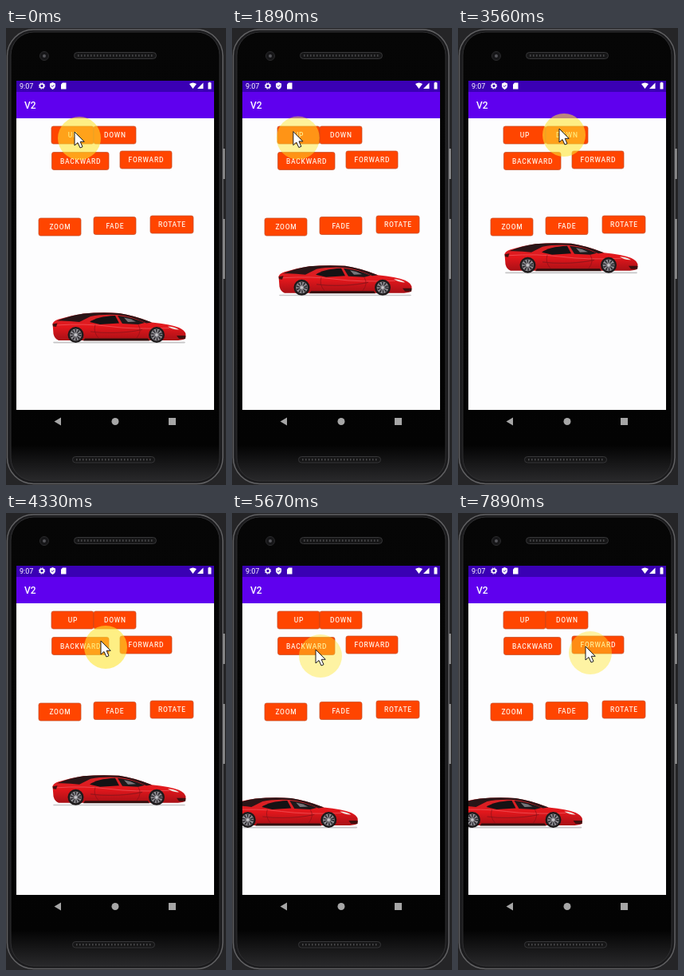
Animation of 276 by 572 pixels, one loop 8 s. Source, as an HTML page:

```html
<!DOCTYPE html>
<html lang="en">
<head>
<meta charset="utf-8">
<title>Car animation demo</title>
<style>
  html, body { margin: 0; width: 100%; height: 100%; overflow: hidden; background: #252527; }
  svg { display: block; width: 276px; height: 572px; font-family: Roboto, sans-serif; font-weight: 500; }
  #buttons text { font-size: 8.45px; letter-spacing: .75px; fill: #ffeee2; text-anchor: middle; }
  #buttons rect { fill: #ff4500; stroke: #c24a22; stroke-width: .7; }
</style>
</head>
<body>
<svg viewBox="0 0 276 572">
  <defs>
    <clipPath id="screen"><rect x="13" y="66" width="248" height="412"/></clipPath>
    <linearGradient id="paint" x1="0" y1="0" x2="0" y2="1">
      <stop offset="0" stop-color="#d3262a"/>
      <stop offset=".5" stop-color="#e3171c"/>
      <stop offset="1" stop-color="#a81016"/>
    </linearGradient>
    <linearGradient id="shell" x1="0" y1="0" x2="0" y2="1">
      <stop offset="0" stop-color="#060606"/>
      <stop offset=".92" stop-color="#030303"/>
      <stop offset="1" stop-color="#29292b"/>
    </linearGradient>
    <g id="wheel">
      <circle r="10" fill="#1d1a1b"/>
      <circle r="7.400" fill="#96959a"/>
      <circle r="4.800" fill="none" stroke="#333136" stroke-width="4.400" stroke-dasharray="1.600 1.416"/>
      <circle r="1.600" fill="#c9c8cc"/>
    </g>
  </defs>

  <!-- phone body -->
  <rect width="276" height="572" fill="#252527"/>
  <path d="M271.500 151h3v38h-3zM271.500 239h3v75h-3z" fill="#a2a2a2"/>
  <rect x="1.500" y="2" width="270.500" height="568.500" rx="33" fill="#1b1b1d" stroke="#626264" stroke-width="1.500"/>
  <rect x="6" y="5" width="262" height="562" rx="29" fill="url(#shell)" stroke="#303032"/>
  <circle cx="48" cy="35" r="5.500" fill="#161618" stroke="#29292b"/>
  <circle cx="48" cy="35" r="2" fill="#55555a"/>
  <g fill="#161617" stroke="#363638">
    <rect x="85.500" y="30.500" width="103" height="8" rx="4"/>
    <rect x="83.500" y="536.500" width="103" height="7.500" rx="3.700"/>
  </g>
  <g stroke="#48484a" stroke-width="2.400" stroke-dasharray="1.500 2.500">
    <path d="M90 34.500h95M88 540.200h95"/>
  </g>

  <!-- screen -->
  <rect x="13" y="66" width="248" height="412" fill="#fdfdfe"/>
  <rect x="13" y="66" width="248" height="14" fill="#3a00b4"/>
  <rect x="13" y="80" width="248" height="33" fill="#5f00ee"/>
  <g fill="#fff">
    <text x="17" y="76" font-size="9" font-weight="400">9:07</text>
    <text x="23" y="101" font-size="12">V2</text>
    <circle cx="45" cy="72.500" r="2.500" fill="none" stroke="#fff" stroke-width="1.600"/>
    <circle cx="45" cy="72.500" r="3.700" fill="none" stroke="#fff" stroke-dasharray="1.450 1.450"/>
    <path d="M58.500 68l3.500 1.400v2.800q0 3-3.500 4.700q-3.500-1.700-3.500-4.700v-2.800z"/>
    <path d="M56.800 72.300l1.300 1.300 2.200-2.300" fill="none" stroke="#3a00b4"/>
    <path d="M71 68.500h4.500v8h-6.500v-6z"/>
    <path d="M230 70q4.500-3 9 0l-4.500 6z"/>
    <path d="M247.500 68.500v7.500h-7.500z"/>
    <path d="M253.500 68.500h1v-.8h2v.8h1v8h-4z"/>
  </g>
  <g fill="#a6a6a6">
    <path d="M69 487.500v10l-8.500-5z"/>
    <circle cx="137" cy="492.500" r="4.500"/>
    <rect x="204" y="488" width="9" height="9"/>
  </g>

  <g id="buttons"></g>

  <g clip-path="url(#screen)">
    <g id="car">
      <path d="M60 393.600H224" stroke="#c6c5c7" stroke-width="1.600" stroke-linecap="round"/>
      <path d="M58.500 370Q60 366 66 364.500Q82 359.500 97 357.500Q120 355.500 142 357Q160 359.500 183 368.500Q206 370.500 217 375Q224 378 225.500 383L225 389Q220 391 212 391H66Q61 389 59.500 383Z" fill="url(#paint)"/>
      <path d="M64 366.500Q80 360 97 357.500Q120 355.500 142 357Q160 359.500 183 368.500L176 369.500Q158 360.500 140 359Q120 358 106 361L92 368Q78 366 64 366.500Z" fill="#2a1517"/>
      <path d="M105 368Q114 361 137 360L142 369.500L118 371Z" fill="#151214"/>
      <path d="M140 360Q158 361.500 174 369L166 371L146 370Z" fill="#1d191b"/>
      <path d="M148 362.500Q156 363.500 163 367.500L153 368Z" fill="#77757a"/>
      <path d="M62 372Q100 369.500 130 373.500T205 375.500" fill="none" stroke="#f2555a" stroke-width=".8"/>
      <path d="M106 380Q140 384 171 377.500" fill="none" stroke="#98141a" stroke-width="1.200"/>
      <path d="M112 371.500Q109 380 116 388M166 371.500Q171 379 164 388" fill="none" stroke="#8a1217" stroke-width=".7"/>
      <path d="M97 391.500H180L178 388.500H99Z" fill="#33100f"/>
      <path d="M58.500 370.500l6-1-1.500 4.500-4-.500z" fill="#45100f"/>
      <path d="M203 373.500Q211 373.500 217 377.500Q209 378 203 373.500Z" fill="#efe2dc"/>
      <path d="M214 385h11.500l-.500 4h-8z" fill="#3f100f"/>
      <use href="#wheel" x="87.500" y="384"/>
      <use href="#wheel" x="189" y="384"/>
    </g>
  </g>

  <g id="pointer">
    <circle id="halo" cx="6" cy="8" r="27" fill="#ffe62e"/>
    <path d="M0 0V17L4 13.500L7 20L10 18.700L7.200 12.300H12.200Z" fill="#fff" stroke="#1a1a1a" stroke-linejoin="round"/>
  </g>
</svg>
<script>
const LOOP = 8000, STEP = 1000 / 9;
const $ = id => document.getElementById(id);
const car = $('car'), pointer = $('pointer'), halo = $('halo');

// label, x, y, width
const buttons = [
  ['UP', 57, 123, 53], ['DOWN', 110, 123, 53],
  ['BACKWARD', 57.5, 155.5, 71.5], ['FORWARD', 143, 154, 65],
  ['ZOOM', 41, 238, 53], ['FADE', 110, 236.5, 53], ['ROTATE', 181, 235, 54]
];
$('buttons').innerHTML = buttons.map(([label, x, y, w]) =>
  `<rect x="${x}" y="${y}" width="${w}" height="22" rx="2.4"/>
   <text x="${x + w / 2 + .4}" y="${y + 14.2}">${label}</text>`).join('');

// time, x, y, halo opacity
const path = [
  [0, 86, 130, .58], [700, 84, 131, .58], [1110, 74, 134, .42], [1500, 68, 134, .42],
  [2000, 78, 129, .5], [2440, 87, 131, .58], [2700, 94, 130, .58], [3100, 124, 127, .58],
  [3560, 127, 126, .58], [3850, 127, 134, .58], [4330, 119, 160, .58], [4750, 106, 169, .5],
  [5670, 105, 171, .44], [6600, 105, 171, .44], [7200, 186, 165, .44],
  [7890, 160, 167, .44], [8000, 160, 167, .44]
];

// eases in and out along a cosine
const ease = p => .5 - Math.cos(Math.PI * Math.min(1, Math.max(0, p))) / 2;
const run = (t, start, length) => ease((t - start) / length);

function pointerAt(t) {
  const i = Math.max(1, path.findIndex(k => k[0] >= t));
  const a = path[i - 1], b = path[i];
  const p = run(t, a[0], b[0] - a[0]);
  return a.map((v, n) => v + (b[n] - v) * p);
}

function draw(now) {
  const t = Math.floor((now % LOOP + 6) / STEP) * STEP % LOOP;
  const carX = -69.5 * run(t, 4770, 1000);
  const carY = -97 * (run(t, 1130, 1330) - run(t, 3185, 1800));
  car.setAttribute('transform', `translate(${carX} ${carY})`);
  const [, x, y, alpha] = pointerAt(t);
  pointer.setAttribute('transform', `translate(${x} ${y})`);
  halo.setAttribute('opacity', alpha);
}

const origin = performance.now();
function tick() {
  draw(performance.now() - origin);
  requestAnimationFrame(tick);
}
tick();
</script>
</body>
</html>
```
